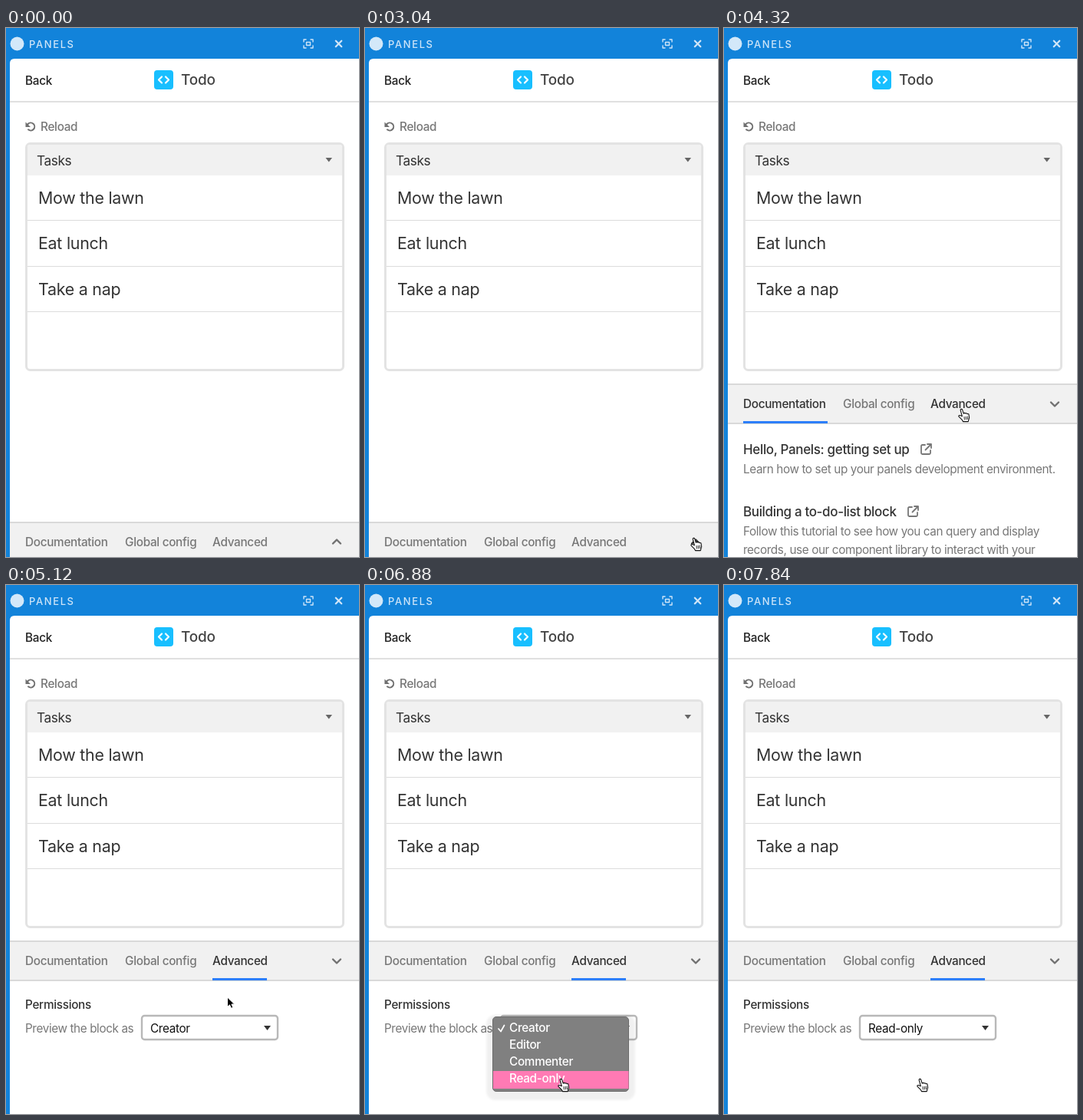
These frames come from a looping animation (460x689 px, 8000 ms). An HTML page:

```html
<!DOCTYPE html>
<html lang="en">
<head>
<meta charset="utf-8">
<title>Todo panel</title>
<style>
  html, body { margin: 0; width: 100%; height: 100%; overflow: hidden; background: #fff; }
  svg { display: block; width: 460px; height: 689px; }
  text { font: 400 15.3px Inter, "Open Sans", sans-serif; letter-spacing: -.4px; fill: #777; white-space: pre; }
  .medium { font-weight: 500; letter-spacing: -.3px; }
  .dark { fill: #333; }
  .title { font-size: 17px; font-weight: 500; letter-spacing: -.35px; fill: #333; }
  .row { font-size: 21.4px; letter-spacing: -.25px; fill: #333; }
  .item { font-weight: 500; letter-spacing: -.3px; fill: #fff; }
  .line { fill: none; stroke-linecap: round; stroke-linejoin: round; }
</style>
</head>
<body>
<svg viewBox="0 0 460 689" xmlns="http://www.w3.org/2000/svg">
  <defs>
    <g id="external" class="line" stroke="#777" stroke-width="1.8">
      <path d="M6 2H2.5Q1 2 1 3.5V12.5Q1 14 2.5 14H11.5Q13 14 13 12.5V9M9 1H14V6M14 1L6.5 8.5"/>
    </g>
  </defs>

  <rect width="460" height="689" fill="#1283da"/>
  <path d="M5 689V46Q5 40 11 40H460V689Z" fill="#fff"/>

  <!-- Title bar -->
  <circle cx="14.5" cy="20.5" r="9" fill="#d3e8f9"/>
  <text x="30" y="25.5" style="font-size:13px;font-weight:500;letter-spacing:1.6px;fill:#cfe5f8">PANELS</text>
  <g class="line" stroke="#cfe5f8" stroke-width="1.4">
    <path d="M388 18V15H391M397 15H400V18M400 23V26H397M391 26H388V23"/>
    <rect x="391.5" y="18.5" width="5" height="4"/>
    <path d="M429.8 16.8L437.2 24.2M437.2 16.8L429.8 24.2" stroke-width="2.3"/>
  </g>

  <!-- Panel heading -->
  <text x="25" y="74" class="medium" style="fill:#222">Back</text>
  <rect x="193" y="55" width="25" height="25" rx="4" fill="#18bfff"/>
  <path class="line" d="M203 63.5L199 67.5L203 71.5M208 63.5L212 67.5L208 71.5" stroke="#fff" stroke-width="2.2"/>
  <text x="228" y="74" style="font-size:19px;font-weight:500;letter-spacing:-.2px;fill:#444">Todo</text>
  <rect x="5" y="95" width="455" height="2" fill="#e0e0e0"/>

  <path class="line" d="M28.6 125A5 5 0 1 1 29 132.3" stroke="#707070" stroke-width="2"/>
  <path d="M25.5 122.5V129H32Z" fill="#707070"/>
  <text x="45" y="134" class="medium">Reload</text>

  <!-- Task table -->
  <rect x="26.5" y="150.5" width="413" height="295" rx="5" fill="#fff" stroke="#e3e3e3" stroke-width="3"/>
  <path d="M28 192V155Q28 152 31 152H435Q438 152 438 155V192Z" fill="#f1f1f1"/>
  <text x="40" y="178.5" style="font-size:17.3px;fill:#333">Tasks</text>
  <path d="M416.5 169H425L420.75 174.5Z" fill="#666"/>
  <path d="M28 250.5H438M28 310.5H438M28 369.5H438" stroke="#dcdcdc"/>
  <text x="42" y="229" class="row">Mow the lawn</text>
  <text x="42" y="288" class="row">Eat lunch</text>
  <text x="42" y="348" class="row">Take a nap</text>

  <!-- Developer drawer -->
  <g id="drawer">
    <rect x="5" y="463" width="455" height="230" fill="#fff"/>
    <rect x="5" y="463" width="455" height="53" fill="#f1f1f1"/>
    <path d="M5 464H460M5 515H460" stroke="#d9d9d9" stroke-width="2"/>
    <text x="25" y="495" class="medium tab">Documentation</text>
    <text x="155" y="495" class="medium tab">Global config</text>
    <text x="269" y="495" class="medium tab">Advanced</text>
    <rect id="underline" y="512" height="3" fill="#2d7ff9"/>
    <path id="chevron" class="line" stroke-width="2.4"/>
  </g>

  <g id="docs">
    <text x="25" y="555" class="title">Hello, Panels: getting set up</text>
    <use href="#external" x="256" y="541"/>
    <text x="25" y="580">Learn how to set up your panels development environment.</text>
    <text x="25" y="636" class="title">Building a to-do-list block</text>
    <use href="#external" x="239" y="622"/>
    <text x="25" y="661">Follow this tutorial to see how you can query and display</text>
    <text x="25" y="685">records, use our component library to interact with your</text>
  </g>

  <g id="advanced">
    <text x="25" y="552" class="medium dark">Permissions</text>
    <text x="25" y="583">Preview the block as</text>
    <rect x="177" y="561" width="177" height="31" rx="3.5" fill="#fff" stroke="#b8b8b8" stroke-width="2.4"/>
    <text id="choice" x="188" y="583" style="fill:#111;letter-spacing:-.35px"></text>
    <path d="M336 574H345L340.5 580Z" fill="#333"/>
  </g>

  <g id="menu">
    <rect x="158" y="560" width="194" height="111" rx="12" fill="#000" opacity=".055" style="filter:blur(1.5px)"/>
    <rect x="166.5" y="562.5" width="177" height="97" rx="4.5" fill="#808080" stroke="#6c6c6c"/>
    <rect id="highlight" x="167" width="176.5" height="23" fill="#ff7ab4"/>
    <path class="line" d="M174 578L177 581.5L181.5 573.5" stroke="#fff" stroke-width="1.7"/>
    <g id="items"></g>
  </g>

  <g id="pointer">
    <g id="ring" fill="none">
      <circle cx="2" cy="7.5" r="15.5" stroke="#fff" stroke-width="1.6"/>
      <circle cx="2" cy="7.5" r="16.5" stroke="#111" stroke-width="1.2"/>
    </g>
    <path id="arrow" d="M0 0V12.5L3 9.8L5 14.3L7.3 13.3L5.4 9H9.2Z" fill="#000" stroke="#fff"/>
    <g id="hand" class="line" stroke="#111" stroke-width="1.1" transform="translate(-5 0)">
      <path fill="#fff" d="M5.4 9.8L3.2 1.9C2.9.2 5.2-.2 5.7 1.4L7.2 6.2C7.6 5.1 9.3 5 9.7 6.2C10.3 5.4 11.7 5.5 12 6.8C12.7 6.2 13.9 6.5 14.1 7.8L14.6 11.5L13.2 16.6H6.6L4.8 13.8L1.2 10.4C.2 9.1 1.8 7.9 3.2 8.8Z"/>
      <path d="M8 10.5L8.4 14M10.2 10.3L10.5 13.8M12.3 10L12.5 13.5" stroke-width=".9"/>
    </g>
  </g>
</svg>
<script>
const LOOP = 8000, STEP = 160;
const $ = id => document.getElementById(id);
const tabs = document.querySelectorAll('.tab');
const roles = ['Creator', 'Editor', 'Commenter', 'Read-only'];
const ROW = 22, FIRST_ROW = 566;

$('items').innerHTML = roles.map((role, i) =>
  `<text class="item" x="188" y="${582 + i * ROW}">${role}</text>`).join('');

// Pointer hot spot: [time, x, y]
const path = [
  [960, 341, 616], [1280, 442, 659], [1600, 442, 659], [1920, 429, 664],
  [3520, 429, 664], [4320, 310, 496], [4800, 310, 496], [5440, 267, 578],
  [6240, 267, 578], [6880, 256, 643], [LOOP, 256, 643]
];
const clicks = [[1440, 1600], [2080, 2400], [2720, 3040], [4640, 4960], [5600, 5920], [7360, 7520]];
const arrowTimes = [[960, 1920], [3840, 4320], [5120, 5440]];

const during = (t, spans) => spans.some(([from, to]) => t >= from && t < to);
const show = (id, on) => $(id).setAttribute('display', on ? 'inline' : 'none');
const set = (id, attrs) => Object.entries(attrs).forEach(([k, v]) => $(id).setAttribute(k, v));
const ease = p => p * p * (3 - 2 * p);

function pointerAt(t) {
  const i = Math.max(1, path.findIndex(([time]) => time >= t));
  const [t0, x0, y0] = path[i - 1], [t1, x1, y1] = path[i];
  const p = ease(Math.min(1, Math.max(0, (t - t0) / (t1 - t0))));
  return [x0 + (x1 - x0) * p, y0 + (y1 - y0) * p];
}

function draw(t) {
  const [x, y] = pointerAt(t);
  const open = t >= 3200;
  const active = !open ? -1 : t < 4640 ? 0 : 2;
  const hovered = t >= 4320 && t < 4960 ? 2 : -1;
  const overChevron = t >= 1920 && t < 3840;

  set('drawer', { transform: `translate(0 ${open ? 0 : 180})` });
  tabs.forEach((tab, i) => tab.classList.toggle('dark', i === active || i === hovered));
  show('underline', open);
  set('underline', active === 2 ? { x: 269, width: 71 } : { x: 25, width: 110 });
  set('chevron', {
    d: open ? 'M426 487.5L431 492.5L436 487.5' : 'M426 491.5L431 486.5L436 491.5',
    stroke: overChevron ? '#333' : '#707070'
  });

  show('docs', active === 0);
  show('advanced', active === 2);
  $('choice').textContent = t < 7840 ? roles[0] : roles[3];

  const row = Math.min(3, Math.max(0, Math.floor((y - FIRST_ROW) / ROW)));
  show('menu', t >= 5760 && t < 7840);
  show('highlight', !during(t, [[7520, 7680]]));
  set('highlight', { y: FIRST_ROW + row * ROW + (row === 3 ? 1 : 0) });

  const arrow = during(t, arrowTimes);
  show('pointer', t >= 960);
  set('pointer', { transform: `translate(${x.toFixed(1)} ${y.toFixed(1)})` });
  show('arrow', arrow);
  show('hand', !arrow);
  show('ring', during(t, clicks));
}

const start = performance.now();
function tick() {
  const t = (performance.now() - start) % LOOP;
  draw(Math.floor(t / STEP) * STEP);
  requestAnimationFrame(tick);
}
draw(0);
requestAnimationFrame(tick);
</script>
</body>
</html>
```
